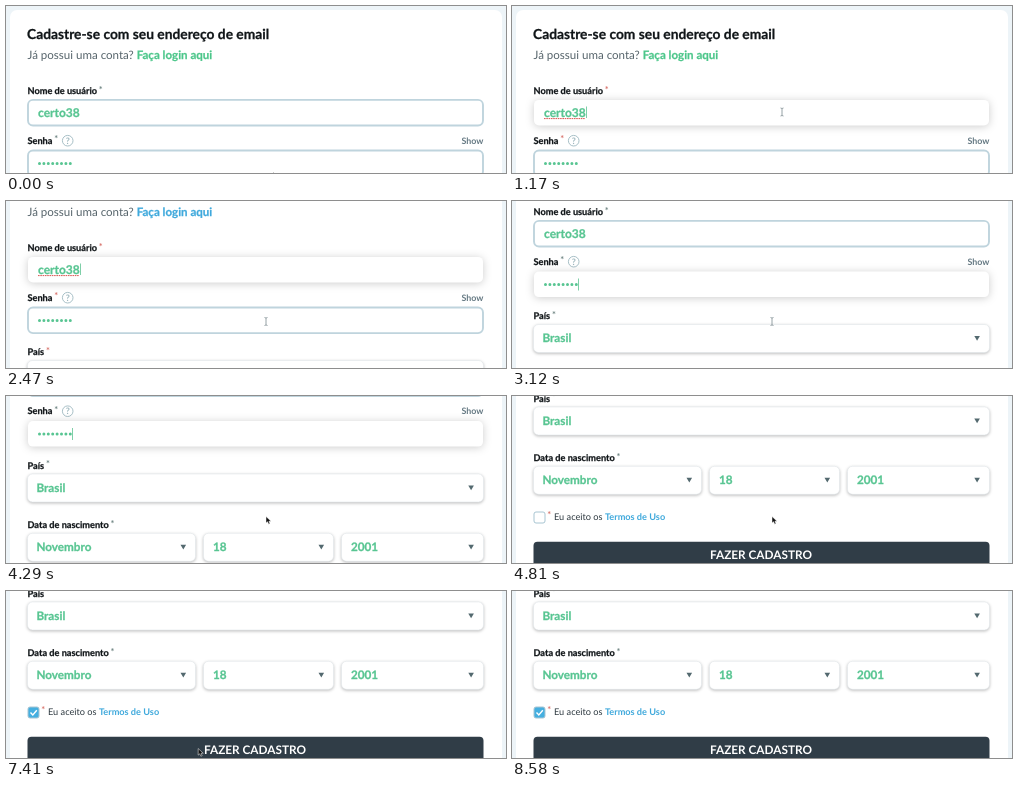
An HTML page that plays this animation: 500x167 px, repeating every 8.84 s.

```html
<!DOCTYPE html>
<html lang="pt-BR">
<head>
<meta charset="utf-8">
<style>
html, body { margin: 0; width: 100%; height: 100%; overflow: hidden; background: #edf4f8; }
svg { display: block; width: 500px; height: 167px; font: 700 9.2px Lato, sans-serif; fill: #101518; }
text { text-rendering: geometricPrecision; white-space: pre; }
.title { font-size: 13.8px; }
.title, .label { stroke: #101518; stroke-width: .25; }
.sub { font-size: 11.55px; font-weight: 400; fill: #56646b; }
.sub tspan { font-weight: 700; fill: var(--link); stroke: var(--link); stroke-width: .25; }
.star { fill: var(--star); stroke: none; }
.small { font-size: 8.9px; fill: #657983; }
.value, .choice { fill: #58c592; stroke: #58c592; stroke-width: .3; }
.value { font-size: 12px; }
.choice { font-size: 11.7px; }
.field { fill: #fff; stroke: #bfd4dd; stroke-width: 1.9; }
.field.focus { stroke: none; filter: drop-shadow(0 1px 4px #0003); }
.select { fill: #fff; stroke: #e3e8eb; stroke-width: .6; filter: drop-shadow(0 1px 1.5px #0004); }
.arrow { fill: #53696f; }
.dots { stroke: #58c592; stroke-width: 3; stroke-linecap: round; stroke-dasharray: 0 4.4; }
.caret { stroke: #7fcfa8; stroke-width: 1; }
.terms { font-weight: 400; fill: #2e3940; }
.terms tspan { font-weight: 700; fill: #3fa9dc; }
.button { font-size: 11.8px; fill: #fff; text-anchor: middle; }
</style>
</head>
<body>
<svg viewBox="0 0 500 167">
  <g id="page">
    <rect x="4" y="4" width="492" height="420" rx="7" fill="#fff"/>
    <text class="title" x="21" y="32.7">Cadastre-se com seu endereço de email</text>
    <text class="sub" x="21.5" y="53">Já possui uma conta? <tspan>Faça login aqui</tspan></text>

    <text class="label" x="21.5" y="88">Nome de usuário<tspan class="star" dx="2" dy="-1.5">*</tspan></text>
    <rect id="user" class="field" x="22" y="93.9" width="455" height="25.6" rx="5"/>
    <text class="value" x="32" y="110.5">certo38</text>
    <path id="spell" d="M32 112.6h41" stroke="#d9534f" stroke-dasharray="1.6 .7"/>
    <path id="userCaret" class="caret" d="M74.5 100.5v11.5"/>

    <text class="label" x="21.5" y="137.7">Senha<tspan class="star" dx="2" dy="-1.5">*</tspan></text>
    <circle cx="61.7" cy="134.7" r="5.3" fill="none" stroke="#a8c0c7"/>
    <text class="small" x="61.7" y="137.8" text-anchor="middle" style="fill:#9db6bd">?</text>
    <text class="small" x="477.5" y="137.7" text-anchor="end">Show</text>
    <rect id="password" class="field" x="22" y="144.5" width="455" height="25.6" rx="5"/>
    <path class="dots" d="M33.5 157.6h31"/>
    <path id="passwordCaret" class="caret" d="M66.5 151.5v12"/>

    <text class="label" x="21.5" y="192.3">País<tspan class="star" dx="2" dy="-1.5">*</tspan></text>
    <rect class="select" x="21.5" y="197.5" width="456" height="28" rx="5"/>
    <text class="choice" x="30.5" y="215.4">Brasil</text>
    <path class="arrow" d="M462.3 209h5.6l-2.8 4.8z"/>

    <text class="label" x="21.5" y="251.8">Data de nascimento<tspan class="star" dx="2" dy="-1.5">*</tspan></text>
    <rect class="select" x="21.5" y="256.8" width="168" height="28" rx="5"/>
    <rect class="select" x="197.5" y="256.8" width="130" height="28" rx="5"/>
    <rect class="select" x="335.5" y="256.8" width="142" height="28" rx="5"/>
    <text class="choice" x="30.5" y="274.7">Novembro</text>
    <text class="choice" x="207" y="274.7">18</text>
    <text class="choice" x="345" y="274.7">2001</text>
    <path class="arrow" d="M174.5 268.3h5.6l-2.8 4.8zM312.5 268.3h5.6l-2.8 4.8zM462.3 268.3h5.6l-2.8 4.8z"/>

    <rect id="box" x="22" y="302.5" width="11" height="11" rx="2" stroke="#a8c5d2"/>
    <path id="tick" d="M24.5 308l2.3 2.4 4-4.6" fill="none" stroke="#fff" stroke-width="1.4"/>
    <text x="35.3" y="308" fill="#d9776f">*</text>
    <text class="terms" x="42" y="310.8">Eu aceito os <tspan>Termos de Uso</tspan></text>

    <rect x="21.5" y="332.3" width="456" height="28" rx="4" fill="#303d47"/>
    <text class="button" x="249" y="349.2">FAZER CADASTRO</text>
  </g>
  <g id="cursor">
    <path id="pointer" d="M0 0v6.6l1.6-1.4 1.1 2.5 1.3-.6-1.1-2.4h2.2z" fill="#111" stroke="#fff" stroke-width=".5"/>
    <path id="beam" d="M-1.5-4Q0-4 0-3V3Q0 4-1.5 4M1.5-4Q0-4 0-3M0 3Q0 4 1.5 4" fill="none" stroke="#7d8b90" stroke-width=".8"/>
  </g>
</svg>
<script>
const LOOP = 8840, STEP = 130;
const scrollKeys = [[1300, 0], [2210, 38], [2730, 38], [3120, 74], [3510, 103.5], [4030, 103.5], [4290, 119.5], [4810, 186.5]];
const xKeys = [[0, 267], [910, 270], [1300, 270], [2210, 260], [5200, 260], [6110, 27], [6890, 27], [7670, 250]];
const yKeys = [[0, 166], [910, 106], [1300, 106], [2210, 120.5], [5200, 120.5], [6110, 122], [6890, 122], [7670, 170]];
const linear = p => p;
const smooth = p => p * p * (3 - 2 * p);
const get = id => document.getElementById(id);
const show = (id, on) => get(id).style.display = on ? '' : 'none';

function valueAt(keys, t, ease) {
  const next = keys.findIndex(key => key[0] > t);
  if (next === 0) return keys[0][1];
  if (next < 0) return keys[keys.length - 1][1];
  const [t0, a] = keys[next - 1], [t1, b] = keys[next];
  return a + (b - a) * ease((t - t0) / (t1 - t0));
}

function draw(now) {
  const t = Math.floor(now % LOOP / STEP) * STEP;
  const within = (from, to) => t >= from && t < to;
  const onUser = within(1040, 2600), onPassword = within(2600, 6240);
  const beam = within(650, 3900), checked = t >= 6240;

  get('page').setAttribute('transform', `translate(0 ${-valueAt(scrollKeys, t, linear)})`);
  get('cursor').setAttribute('transform', `translate(${valueAt(xKeys, t, smooth)} ${valueAt(yKeys, t, smooth)})`);
  get('user').classList.toggle('focus', onUser);
  get('password').classList.toggle('focus', onPassword);
  show('spell', onUser);
  show('userCaret', onUser);
  show('passwordCaret', onPassword && !within(3770, 3900));
  show('beam', beam);
  show('pointer', !beam);
  show('tick', checked);
  get('box').setAttribute('fill', checked ? '#45afe0' : '#fff');

  const style = document.documentElement.style;
  style.setProperty('--star', onUser ? '#d8736c' : '#6f8583');
  style.setProperty('--link', t < 1430 ? '#4cc68a' : '#3fa9dc');
  requestAnimationFrame(draw);
}
draw(performance.now());
</script>
</body>
</html>
```
